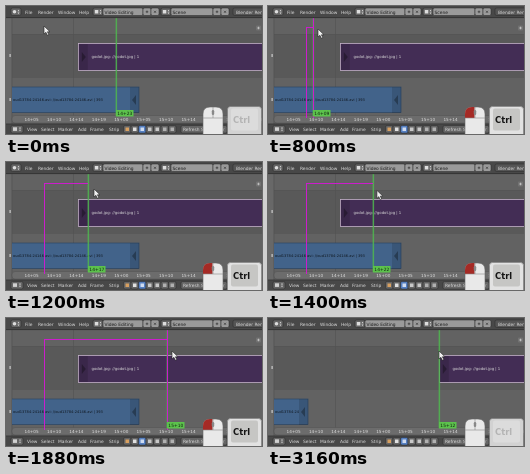
An HTML page for the animation above (3.28 s loop, 256x128 px).

```html
<!DOCTYPE html>
<html lang="en">
<head>
<meta charset="utf-8">
<title>Strip trimming</title>
<style>
html, body { margin: 0; width: 100%; height: 100%; overflow: hidden; background: #606060; }
svg { display: block; width: 100%; height: 100%; }
text { font-family: "DejaVu Sans", sans-serif; font-size: 4.4px; fill: #dcdcdc; }
.field { fill: #1c1c1c; }
.strip text { font-size: 3.85px; }
.key { font-size: 8.4px; font-weight: bold; }
</style>
</head>
<body>
<svg id="stage" viewBox="0 0 256 128"></svg>
<script>
const LOOP = 3280, STEP = 40, LAG = 50;
const PRESS = 440, CUT = 2200, RELEASE = 2560;
const FRAME = 4.67, ORIGIN = 26, START = 38, TOP = 22;
const path = [[PRESS, 38, 20], [640, 39, 20], [800, 50, 23], [1200, 88, 27],
  [1640, 134, 30], [1880, 166, 33], [2080, 171, 33]];

const stage = document.getElementById("stage");
const $ = id => document.getElementById(id);
const rect = (x, y, w, h, fill, extra = "") =>
  `<rect x="${x}" y="${y}" width="${w}" height="${h}" fill="${fill}" ${extra}/>`;
const text = (x, y, s, extra = "") => `<text x="${x}" y="${y}" ${extra}>${s}</text>`;
const shape = (d, fill, extra = "") => `<path d="${d}" fill="${fill}" ${extra}/>`;
const set = (id, attrs) => {
  for (const k in attrs) $(id).setAttribute(k, attrs[k]);
};
const show = (id, on) => set(id, { visibility: on ? "visible" : "hidden" });
const timecode = n => {
  const f = n + 5;
  return `${14 + Math.floor(f / 24)}+${String(f % 24).padStart(2, "0")}`;
};
const button = (x, y, w, fill = "#656565") =>
  rect(x, y, w, 7.5, fill, 'rx="1.6" stroke="#292929" stroke-width=".5"');
const mark = (d, color = "#ddd") => shape(d, "none", `stroke="${color}" stroke-width=".6"`);
const plus = (x, y, color) => mark(`M${x - 1.3} ${y}h2.6M${x} ${y - 1.3}v2.6`, color);
const cross = (x, y, color) => mark(`M${x - 1} ${y - 1}l2 2m0 -2l-2 2`, color);
const arrows = (x, y) => shape(`M${x - 1} ${y - .6}l1 -1.5 1 1.5zM${x - 1} ${y + .6}l1 1.5 1 -1.5z`, "#ddd");

// Icon, light name field and its add / remove buttons.
function selector(x, w, name) {
  const light = "#9a9a9a", end = x + w;
  return button(x - 10, 2, 10) + rect(x - 8.2, 4, 3.5, 3.5, "#ddd") + arrows(x - 2.5, 5.8) +
    button(x, 2, w, light) + text(x + 1.5, 7.5, name, 'class="field"') +
    button(end, 2, 8, light) + plus(end + 4, 5.8, "#222") +
    button(end + 8, 2, 8, light) + cross(end + 12, 5.8, "#222");
}

function header() {
  const menus = [[19, "File"], [32, "Render"], [52, "Window"], [73, "Help"]];
  return rect(0, 0, 256, 12, "#484848") + rect(0, 11.3, 256, .8, "#303030") +
    button(5, 2, 10) + '<circle cx="8.5" cy="5.8" r="1.8" fill="#ddd"/>' + arrows(12.5, 5.8) +
    menus.map(([x, s]) => text(x, 7.5, s)).join("") +
    selector(97, 40, "Video Editing") + selector(165, 42, "Scene") +
    button(227, 2, 40, "#555") + text(230, 7.5, "Blender Render");
}

function footer() {
  const menus = [[21, "View"], [35, "Select"], [52, "Marker"], [72, "Add"], [84, "Frame"], [103, "Strip"]];
  const icons = ["#d8a060", "#e0e0e0", "#d0dcf0", "#c8c8c8", "#c8c8c8", "#b0b0b0", "#b0b0b0"];
  return rect(0, 118, 256, 10, "#484848") + rect(0, 117.6, 256, .7, "#303030") +
    button(5, 119.5, 12) + rect(7, 121.3, 4, 3.6, "#d0d0d0") + arrows(14, 123.2) +
    menus.map(([x, s]) => text(x, 125, s)).join("") +
    icons.map((c, i) => button(117.5 + i * 7.5, 119.5, 7.5, i === 2 ? "#5680c2" : "#656565") +
      rect(119.5 + i * 7.5, 121.5, 3.5, 3.5, c)).join("") +
    button(175, 119.5, 46) + text(177, 125, "Refresh Sequencer");
}

function ruler() {
  let out = rect(6, 109.5, 250, 7.5, "#6c6c6c", 'rx="3" stroke="#505050" stroke-width=".5"');
  // One label every fifth of a second, at 24 frames per second.
  for (let i = -4; i < 7; i++) {
    const n = 19 + i * 4.8;
    out += text(ORIGIN + n * FRAME + .5, 115, timecode(Math.round(n)), 'text-anchor="middle" style="font-size:4.2px"');
  }
  return out;
}

function strips() {
  const handle = (x, y, dir) => rect(dir > 0 ? x : x - 9, y - 13, 9, 26, "#000", 'opacity=".13"') +
    shape(`M${x + 3 * dir} ${y - 5}l${4 * dir} 5 ${-4 * dir} 5z`, "#000", 'opacity=".3"');
  return '<g class="strip" clip-path="url(#view)">' +
    rect(5, 81, 128, 25.5, "#42638a", 'id="movie" stroke="#2c4563" stroke-width=".7"') +
    '<g clip-path="url(#label)">' +
    text(7, 95, "oud13784-24146.avi: //oud13784-24146.avi | 393", 'style="fill:#101820;font-size:3.6px"') + "</g>" +
    `<g id="movieEnd">${handle(0, 94, -1)}</g>` +
    '<g id="image">' + rect(.4, 37.5, 260, 27, "#432d55", 'stroke="#c2b0c8" stroke-width=".8"') +
    handle(.8, 51, 1) + text(13.5, 52, "godot.jpg: //godot.jpg | 1") + "</g></g>";
}

function overlay() {
  const body = "M197 108q0 -7 7 -7h6q7 0 7 7v22h-20z";
  const cap = (side, face, ink) => rect(221.5, 100.5, 34, 32, side, 'rx="3" stroke="#777" stroke-width=".6"') +
    rect(225, 102.5, 27, 22, face, 'rx="2"') + text(227, 117, "Ctrl", `class="key" style="fill:${ink}"`);
  return shape(body, "#e9e9e9", 'stroke="#666" stroke-width=".6"') +
    shape("M206.5 101h-2.5q-7 0 -7 7v4h9.5z", "#a52a25", 'id="press"') +
    mark("M197 112h20M207 101v11", "#888") +
    rect(205.8, 104, 2.4, 5, "#888", 'rx="1.2"') +
    cap("#d2d2d2", "#dcdcdc", "#b4b4b4") + `<g id="key">${cap("#e2e2e2", "#c6c6c4", "#161616")}</g>`;
}

function build() {
  stage.innerHTML =
    '<defs><clipPath id="view"><rect x="6" y="12" width="250" height="100"/></clipPath>' +
    '<clipPath id="label"><rect id="labelClip" x="7" y="81" height="26"/></clipPath></defs>' +
    rect(0, 0, 256, 128, "#626262") + rect(6, 28, 250, 43, "#595959") +
    rect(6, 28, 250, .5, "#505050") + rect(6, 71, 250, .5, "#505050") +
    rect(67, 12, .6, 98, "#525252") +
    rect(0, 12, 6, 106, "#686868") + rect(5.6, 12, .7, 106, "#505050") +
    rect(3.5, 48, 1.2, 3, "#ccc") + rect(3.5, 92, 1.2, 3, "#ccc") +
    ruler() + strips() +
    rect(250, 19.5, 5, 5, "#777", 'rx="1" opacity=".8"') + plus(252.5, 22) +
    rect(0, 12, 1.5, 98, "#4fb84f", 'id="playhead" opacity=".85"') +
    '<g id="box" fill="none" stroke="#cc1ccc" stroke-width="1">' +
    `<path d="M${START}.5 112V${TOP}"/><path id="roof"/><path id="edge"/></g>` +
    '<g id="tag">' + rect(0, 104, 17.5, 6.5, "#5cc24c") +
    text(8.8, 109, "", 'id="code" text-anchor="middle" style="fill:#102010"') + "</g>" +
    footer() + overlay() + header() +
    shape("M0 0V8L1.9 6.3 3.3 9.3 4.8 8.6 3.4 5.8H6z", "#f0f0f0", 'id="cursor" stroke="#222" stroke-width=".6"');
}

function pointer(t) {
  if (t <= path[0][0]) return path[0].slice(1);
  const i = path.findIndex(p => t < p[0]);
  if (i < 0) return path[path.length - 1].slice(1);
  const a = path[i - 1], b = path[i], k = (t - a[0]) / (b[0] - a[0]);
  return [1, 2].map(j => a[j] + (b[j] - a[j]) * k);
}

function keyLevel(t) {
  if (t < 200 || t >= 2840) return 0;
  return t < 280 || t >= 2800 ? .5 : 1;
}

function draw(now) {
  const t = Math.floor((now % LOOP) / STEP) * STEP;
  const [cx, cy] = pointer(t);
  const n = t < PRESS ? 18 : Math.round((pointer(t - LAG)[0] - ORIGIN) / FRAME);
  const x = Math.round(ORIGIN + n * FRAME);
  const cut = t >= CUT, end = cut ? 40 : 133;

  set("cursor", { transform: `translate(${cx} ${cy})` });
  set("playhead", { x: x - .4 });
  set("tag", { transform: `translate(${x} 0)` });
  $("code").textContent = timecode(n);

  show("box", t >= PRESS && !cut);
  set("roof", { d: `M${START} ${TOP - .5}H${x}` });
  set("edge", { d: t < 1000 || t > 1760 ? `M${x + .5} 12V112` : "" });

  set("movie", { width: end - 5 });
  set("movieEnd", { transform: `translate(${end} 0)` });
  set("labelClip", { width: end - 16 });
  set("image", { transform: `translate(${cut ? 171 : 72} 0)` });

  show("press", t >= PRESS && t < RELEASE);
  set("key", { opacity: keyLevel(t) });
}

build();
const begin = performance.now();
function tick() {
  draw(performance.now() - begin);
  requestAnimationFrame(tick);
}
tick();
</script>
</body>
</html>
```
